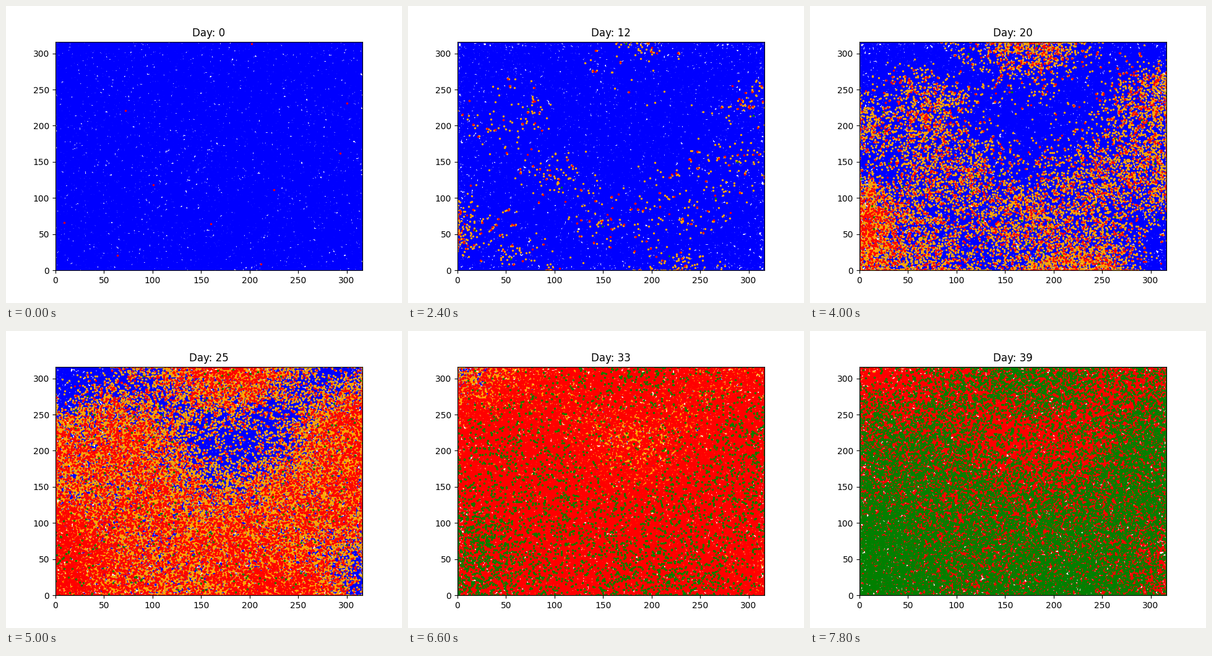
A matplotlib script for the animation above (8 s loop, 640 px wide and 480 px high).

```python
import numpy as np
import matplotlib.pyplot as plt
from matplotlib.animation import FuncAnimation

PEOPLE = 100_000
SIDE = PEOPLE ** 0.5      # one person per unit of area
DAYS = 40
STEP = 14                 # largest daily move along each axis
CELL = np.pi ** 0.5       # contact neighbourhood
P_INFECT = 0.5
INCUBATION = 5
RECOVERY = 17             # days from exposure to recovery
COLORS = ("blue", "orange", "red", "green")
CARRIERS = [(202, 313), (300.5, 231), (72, 221), (293, 162), (101, 118),
            (225, 111), (9, 66), (160, 64), (64, 21), (211.5, 8.5)]


def count_contacts(pos, sick):
    """Number of infectious people sharing each person's cell."""
    width = int(SIDE / CELL) + 1
    col, row = (pos / CELL).astype(int).T
    cell = row * width + col
    return np.bincount(cell[sick], minlength=width * width)[cell]


def stages(age):
    """0 susceptible, 1 exposed, 2 infectious, 3 recovered."""
    return np.digitize(age, (0, INCUBATION, RECOVERY))


def simulate():
    rng = np.random.default_rng(7)
    first = slice(len(CARRIERS))
    pos = rng.uniform(0, SIDE, (PEOPLE, 2))
    pos[first] = CARRIERS
    reach = np.full((PEOPLE, 1), STEP)
    reach[first] = STEP / 2      # carriers stay nearer to home
    age = np.full(PEOPLE, -1)
    age[first] = INCUBATION
    history = [(pos.astype(np.float32), stages(age))]
    for _ in range(1, DAYS):
        pos = np.clip(pos + reach * rng.uniform(-1, 1, pos.shape), 0, SIDE)
        age[age >= 0] += 1
        stage = stages(age)
        risk = 1 - (1 - P_INFECT) ** count_contacts(pos, stage == 2)
        age[(stage == 0) & (rng.random(PEOPLE) < risk)] = 0
        history.append((pos.astype(np.float32), stages(age)))
    return history


history = simulate()

fig, ax = plt.subplots(figsize=(6.4, 4.8), dpi=100)
ax.set_xlim(0, SIDE)
ax.set_ylim(0, SIDE)
layers = [ax.scatter([], [], s=2, color=c) for c in COLORS]
title = ax.set_title("Day: 0")


def draw(day):
    pos, stage = history[day]
    for k, layer in enumerate(layers):
        layer.set_offsets(pos[stage == k])
    title.set_text(f"Day: {day}")
    return [*layers, title]


anim = FuncAnimation(fig, draw, frames=DAYS, interval=200, repeat=True,
                     repeat_delay=0, blit=False)
plt.show()
```
